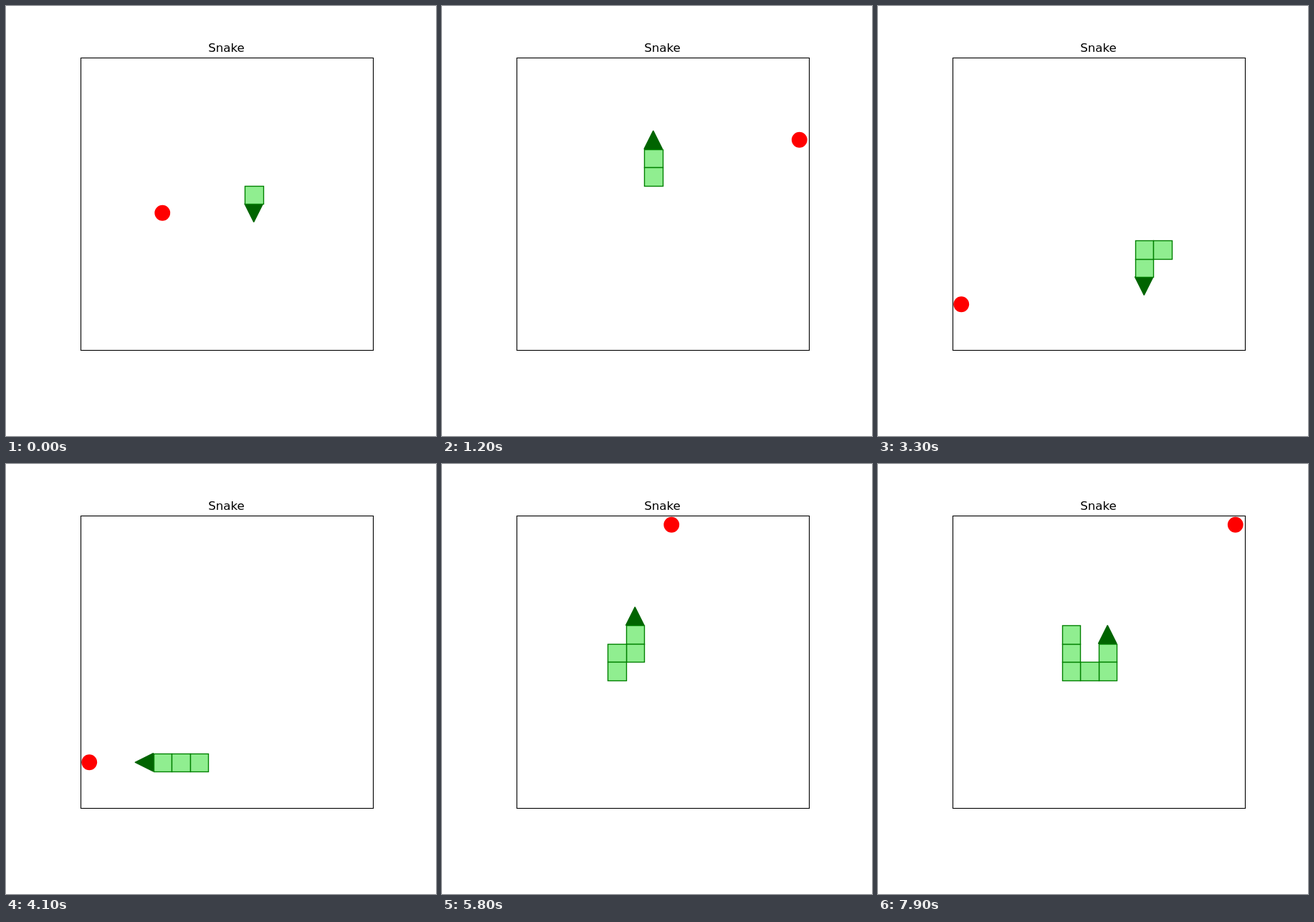
An HTML page with a canvas that plays this animation: 600 px wide and 600 px high, repeating every 8 s.

```html
<!DOCTYPE html>
<html lang="en">
<head>
<meta charset="utf-8">
<title>Snake</title>
<style>
  html, body { margin: 0; width: 100%; height: 100%; overflow: hidden; background: #fff; }
  canvas { display: block; width: 600px; height: 600px; }
</style>
</head>
<body>
<canvas id="stage" width="600" height="600"></canvas>
<script>
const ctx = document.getElementById('stage').getContext('2d');
const LEFT = 103.5, TOP = 72, CELL = 25.5, SIZE = 408;
const STEP = 100, LOOP = 8000, EDGE = 100 / 72;
const DIRS = { U: [0, -1], D: [0, 1], L: [-1, 0], R: [1, 0] };

// One letter per step; the head reaches a food at the end of each leg.
const LEGS = [
  'DLLLLL',
  'URRURUURRRRRRRR',
  'DDLDLDLDLDLDDDLLLLLLLLLL',
  'URRUURRURUURUURUURUUU',
  'LLDDDDDDDD',
  'RRUU'
];
const FOODS = [[4, 8], [15, 4], [0, 13], [8, 0], [6, 8], [15, 0]];

const moves = LEGS.join('');
const trail = [[9, 7]];
for (const m of moves) {
  const [x, y] = trail[trail.length - 1];
  trail.push([x + DIRS[m][0], y + DIRS[m][1]]);
}

let total = -1;
const mealSteps = LEGS.slice(0, -1).map(leg => total += leg.length);

const px = col => LEFT + col * CELL;
const py = row => TOP + row * CELL;
const snap = v => Math.floor(v + 0.5) + 0.5;

function drawFood([col, row]) {
  ctx.fillStyle = '#ff0000';
  ctx.beginPath();
  ctx.arc(px(col + 0.5), py(row + 0.5), 0.4 * CELL + EDGE / 2, 0, Math.PI * 2);
  ctx.fill();
}

function drawHead([col, row], [dx, dy]) {
  const cx = px(col + 0.5), cy = py(row + 0.5), h = CELL / 2;
  ctx.fillStyle = ctx.strokeStyle = '#006400';
  ctx.lineWidth = EDGE;
  ctx.lineJoin = 'bevel';
  ctx.beginPath();
  ctx.moveTo(cx + dx * h, cy + dy * h);
  ctx.lineTo(cx - (dx + dy) * h, cy + (dx - dy) * h);
  ctx.lineTo(cx + (dy - dx) * h, cy - (dx + dy) * h);
  ctx.closePath();
  ctx.fill();
  ctx.stroke();
}

function drawSegment([col, row]) {
  const x = snap(px(col)), y = snap(py(row));
  const w = snap(px(col + 1)) - x, h = snap(py(row + 1)) - y;
  ctx.fillStyle = '#90ee90';
  ctx.strokeStyle = '#008000';
  ctx.lineWidth = EDGE;
  ctx.lineJoin = 'miter';
  ctx.fillRect(x, y, w, h);
  ctx.strokeRect(x, y, w, h);
}

function drawBoard() {
  ctx.strokeStyle = '#000';
  ctx.lineWidth = 0.8 * EDGE;
  ctx.lineJoin = 'miter';
  ctx.strokeRect(snap(LEFT), snap(TOP), SIZE, SIZE);
  ctx.fillStyle = '#000';
  ctx.font = '16.667px "DejaVu Sans", sans-serif';
  ctx.textAlign = 'center';
  ctx.textBaseline = 'alphabetic';
  ctx.fillText('Snake', 307.5, 64);
}

function draw(time) {
  const step = Math.floor((time % LOOP) / STEP);
  const eaten = mealSteps.filter(s => s <= step).length;
  const head = step + 1;

  ctx.fillStyle = '#fff';
  ctx.fillRect(0, 0, 600, 600);

  ctx.save();
  ctx.beginPath();
  ctx.rect(104, 72, SIZE, SIZE);
  ctx.clip();
  drawHead(trail[head], DIRS[moves[step]]);
  for (let i = 1; i <= eaten + 1; i++) drawSegment(trail[head - i]);
  drawFood(FOODS[eaten]);
  ctx.restore();

  drawBoard();
}

const start = performance.now();
function tick() {
  draw(performance.now() - start);
  requestAnimationFrame(tick);
}
tick();
</script>
</body>
</html>
```
